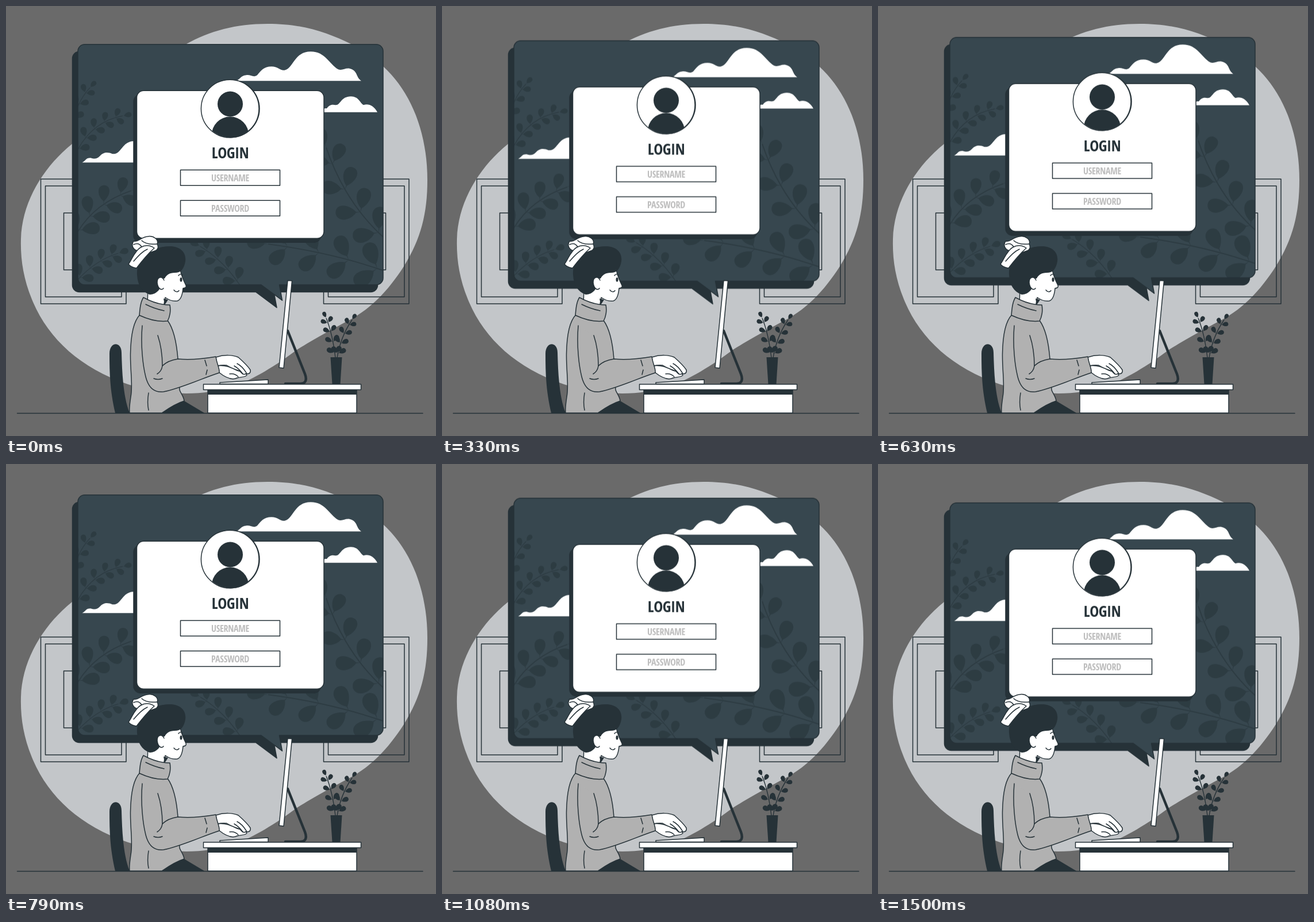
Write an HTML page that moves like this. It is 748 px wide and 748 px high and loops after 1540 ms.

```html
<!DOCTYPE html>
<html lang="en">
<head>
<meta charset="utf-8">
<title>Login</title>
<style>
  html, body { margin: 0; width: 100%; height: 100%; overflow: hidden; background: #6a6a6a; }
  svg { display: block; width: 100vw; height: 100vh; }
  .dark { fill: #263238; }
  .line { fill: none; }
  .white { fill: #fff; }
  .wool { fill: #b1b1b1; }
  .line, .ink { stroke: #263238; stroke-width: 1.5; stroke-linecap: round; stroke-linejoin: round; }
  .float { animation: float 1.54s linear -40ms infinite; }
  @keyframes float { 50% { transform: translateY(-14.96px); } }
  text {
    font-family: 'Open Sans Condensed', 'Roboto Condensed', Roboto, 'Open Sans', sans-serif;
    font-stretch: 75%;
    text-anchor: middle;
  }
  .title { font-size: 27px; letter-spacing: -.4px; fill: #263238; }
  .hint { font-size: 16px; font-weight: 300; letter-spacing: -.3px; fill: #bdbdbd; }
</style>
</head>
<body>
<svg viewBox="0 0 748 748">
  <defs>
    <path id="bubble" d="M137 67.6H644a12 12 0 0 1 12 12V473.8a12 12 0 0 1-12 12H475.5L480.5 513 444 485.8H137a12 12 0 0 1-12-12V79.6a12 12 0 0 1 12-12Z"/>
    <clipPath id="inBubble"><use href="#bubble"/></clipPath>
    <clipPath id="inAvatar"><circle cx="390" cy="179.3" r="50"/></clipPath>
  </defs>

  <path fill="#c3c6c9" d="M455 31C520 31 560 47 600 66 625 80 640 92 656 105 705 150 733 220 733 303 733 360 722 405 692 453 668 490 640 523 598 546 560 566 535 580 506 598 470 625 430 650 395 662 340 680 270 677 212 658 130 630 75 580 47 515 30 475 25 440 26 405 28 340 65 280 116 239 200 180 250 105 312 67 355 43 400 31 455 31Z"/>

  <g class="line">
    <path d="M60.5 301H209V518H60.5ZM68.5 313H201V506H68.5ZM100.5 360H169V459H100.5Z"/>
    <path d="M552.5 301H701V518H552.5ZM560.5 313H693V506H560.5ZM592 360H660.5V459H592Z"/>
  </g>

  <g class="float">
    <use href="#bubble" class="dark ink" transform="translate(-9.5 12.5)"/>
    <use href="#bubble" class="ink" fill="#37474f"/>
    <g clip-path="url(#inBubble)"><g id="foliage" opacity=".52"></g></g>
    <g class="white">
      <path d="M400 131C408 128 408 122 418 121 426 120 430 126 437 121 444 113 448 106 462 106 474 106 478 115 486 112 500 108 502 80 530 80 556 80 562 102 578 111 586 114 592 106 602 111 612 116 609 125 618 131Z"/>
      <path d="M540 185.5C552 182 551 178 558 179 563 172 568 172 573 173 582 174 582 158 600 158 614 158 616 170 622 173 630 170 640 174 646 185.5Z"/>
      <path d="M132.500 273C139 270 138 265 147 265 154 267 158 267 163 262 170 254 178 255 185 258 198 260 201 243 213 238 221 234 230 236 240 240V273Z"/>
    </g>
    <rect class="dark ink" x="222" y="155" width="325.500" height="257" rx="12"/>
    <rect class="white ink" x="227.500" y="148" width="325.500" height="257" rx="12"/>
    <circle class="dark" cx="391" cy="179.500" r="50.700"/>
    <circle class="white ink" cx="389.700" cy="179.300" r="50.300"/>
    <circle class="dark" cx="390" cy="171.300" r="22"/>
    <circle class="dark" cx="390" cy="225.700" r="32.300" clip-path="url(#inAvatar)"/>
    <text class="title" x="390" y="265.500">LOGIN</text>
    <path class="line" d="M303.500 286H476.500V313H303.500ZM303.500 339H476.500V366H303.500Z"/>
    <text class="hint" x="390" y="305.500">USERNAME</text>
    <text class="hint" x="390" y="358.500">PASSWORD</text>
  </g>

  <!-- monitor, desk, plant -->
  <path class="line" style="stroke-width:4.500" d="M490 565 520 640C524 651 521 657 512 657H486"/>
  <path class="white ink" d="M490 477.500 497.500 478 483 630 475 629Z"/>
  <path class="dark" d="M564.500 611H584.500L581.500 658H567.500Z"/>
  <g id="plant"></g>

  <!-- chair and woman -->
  <path class="dark" d="M190 708C181 670 180 640 180 605 180 583 201 583 201 603 202 640 204 680 215 708Z"/>
  <path class="dark" d="M271 708.500C284 699 297 691 310 687L346 708.500Z"/>
  <path class="white ink" d="M247 490 246 520 274 524 277 507C284 512 292 514 298 513 305 511 307 501 308 491 312 491 314 489 313 486 309 478 305 470 303 458L265 462Z"/>
  <path class="dark" d="M274 509 282 511 276 520Z"/>
  <path class="dark" d="M250 502C236 497 229 485 228 468 226 440 252 418 285 418 306 418 316 432 311 449 308 458 304 464 294 464 284 464 279 468 276 474L266 494C262 499 256 502 250 502Z"/>
  <path class="white" d="M264 474H278V495H268Z"/>
  <path class="white ink" d="M275 477C271 469 263 471 263 481 264 491 270 496 274 491"/>
  <path class="line" d="M300 469C302 466 305 466 307 468M292 494C295 498 299 498 301 495"/>
  <ellipse class="dark" cx="304.500" cy="476" rx="2" ry="3.800"/>
  <g class="white ink">
    <path d="M222 409C230 411 235 402 246 401 256 399 266 406 263 414 266 420 264 424 259 426 246 432 236 428 229 426 221 424 217 416 222 409Z"/>
    <path d="M213 449C220 440 223 427 234 420 243 415 252 417 258 421 248 430 236 444 227 456 221 455 216 453 213 449Z"/>
    <path class="line" d="M236 408C242 414 252 415 263 414M222 415C228 412 233 414 236 419M222 444C230 435 237 427 246 423"/>
  </g>

  <path class="wool ink" d="M233 537C222 548 217 575 216.500 605 216 635 221 660 217 680 215 695 214 700 215 708H271C284 699 297 691 310 687 309 679 304 674 302 668L299 614C297 588 292 562 281 547Z"/>
  <path class="wool ink" d="M239 507C250 513 267 520 285 520 287 530 285 541 281 548 263 550 247 545 232 538 233 526 234 515 239 507Z"/>
  <path class="line" d="M243 519C255 525 264 528 275 530M248 673C246 685 246 694 248 703"/>
  <g class="white ink">
    <path d="M367 626C378 624 391 628 402 634 410 636 418 638 419 642 417 646 408 645 402 647 392 652 380 645 370 637Z"/>
    <path d="M365 611C380 606 395 607 404 611 412 618 421 627 425 633 426 638 423 641 418 639 414 643 409 639 407 635 398 632 390 629 384 625 377 624 372 625 367 626Z"/>
    <path class="line" d="M402 622C408 625 413 630 418 638M397 626C402 629 407 633 412 640M389 640C395 639 400 641 404 645"/>
  </g>
  <path class="wool ink" d="M237 556C234 590 238 625 243 645 248 665 258 673 274 671 305 665 340 648 371 638 372 630 367 624 365 610 342 614 320 616 299 614 286 616 278 620 272 626 272 603 269 588 264 573"/>
  <path class="line" d="M272 626C271 633 268 637 263 640M257 648C262 650 267 650 272 648M346 616 349 626M350 633 348 641"/>

  <path class="white ink" d="M372 655 456 650V657.500H372Z"/>
  <path class="white ink" d="M351 668H610V708H351Z"/>
  <path class="dark" d="M351 667H610V676H351Z"/>
  <path class="white ink" d="M343.500 658H617.500V667.500H343.500Z"/>
  <path class="line" d="M19.500 708.500H725"/>
</svg>
<script>
  const dark = '#263238';

  function add(parent, attrs) {
    const path = document.createElementNS('http://www.w3.org/2000/svg', 'path');
    for (const key in attrs) path.setAttribute(key, attrs[key]);
    parent.append(path);
  }

  // Leaf on a short stalk, broadest near its outer end.
  function leaf(x, y, angle, size) {
    const at = (u, v) => {
      const c = Math.cos(angle), s = Math.sin(angle);
      return `${(x + size * (u * c - v * s)).toFixed(1)} ${(y + size * (u * s + v * c)).toFixed(1)}`;
    };
    return `M${at(0, 0)}L${at(.2, -.02)}C${at(.45, -.4)} ${at(1.05, -.5)} ${at(1.15, -.08)}` +
      `C${at(1.2, .4)} ${at(.6, .42)} ${at(.2, .02)}Z`;
  }

  // Curved stem with paired leaves and one at the tip.
  function branch(parent, [x0, y0, x1, y1, x2, y2], pairs, size, stem) {
    let d = '';
    for (let i = 0; i < pairs; i++) {
      const t = (i + .4) / pairs, s = 1 - t;
      const x = s * s * x0 + 2 * s * t * x1 + t * t * x2;
      const y = s * s * y0 + 2 * s * t * y1 + t * t * y2;
      const a = Math.atan2(s * (y1 - y0) + t * (y2 - y1), s * (x1 - x0) + t * (x2 - x1));
      const k = size * (1.05 - .2 * t);
      d += leaf(x, y, a - .9, k) + leaf(x, y, a + .9, k);
    }
    d += leaf(x2, y2, Math.atan2(y2 - y1, x2 - x1), size * .8);
    add(parent, { d, fill: dark });
    add(parent, { d: `M${x0} ${y0}Q${x1} ${y1} ${x2} ${y2}`, fill: 'none', stroke: dark, 'stroke-width': stem });
  }

  const foliage = document.getElementById('foliage');
  branch(foliage, [115, 205, 125, 165, 146, 143], 3, 16, 1.2);
  branch(foliage, [121, 258, 148, 202, 203, 192], 5, 17, 1.2);
  branch(foliage, [120, 402, 150, 345, 218, 322], 4, 31, 1.5);
  branch(foliage, [122, 480, 155, 443, 195, 431], 4, 20, 1.2);
  branch(foliage, [408, 488, 378, 443, 338, 419], 4, 21, 1.2);
  branch(foliage, [662, 408, 590, 345, 557, 247], 4, 38, 1.8);
  branch(foliage, [665, 464, 570, 430, 456, 415], 4, 40, 1.8);

  const plant = document.getElementById('plant');
  branch(plant, [573, 612, 568, 570, 557, 543], 4, 13, 1.4);
  branch(plant, [576, 612, 582, 575, 602, 546], 4, 13, 1.4);
</script>
</body>
</html>
```
